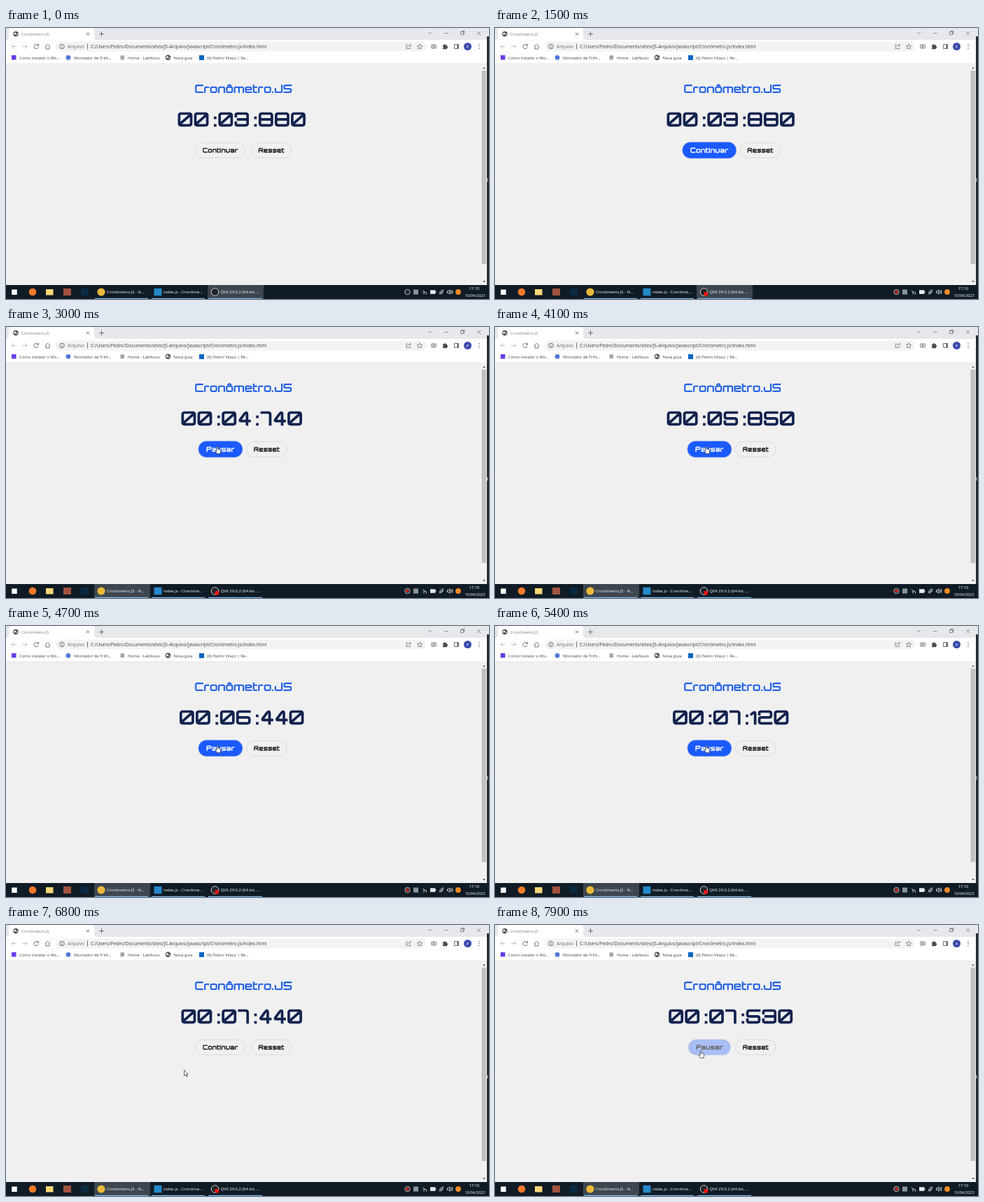
An HTML page that plays this animation: 690 px wide and 388 px high, repeating every 8000 ms.

```html
<!DOCTYPE html>
<html lang="pt-BR">
<head>
<meta charset="utf-8">
<title>Cronômetro.JS</title>
<style>
  html, body { margin: 0; width: 100%; height: 100%; overflow: hidden; background: #f0f0f0; }
  svg { display: block; width: 690px; height: 388px; }
  text { font: 5.85px "Open Sans", "Noto Sans", sans-serif; fill: #3c4043; }
  .url { font-size: 6.7px; }
  .bar text { fill: #fff; }
  .line { fill: none; stroke: #5f6368; stroke-width: .9; }
  .glyphs { fill: none; stroke-linecap: square; }
  .pill { stroke-width: .7; }
</style>
</head>
<body>
<svg viewBox="0 0 690 388">
  <defs>
    <g id="globe">
      <circle r="3.7" fill="#4a4d51"/>
      <path d="M-2.6-1.2Q-1-2.6 .3-1.6T-.4.5-1 2.6Q-2.8 1-2.6-1.2M1 .4 2.6-.6Q2.8 1.4 1.2 2.4Z" fill="#fff"/>
    </g>
  </defs>

  <!-- browser frame -->
  <rect width="690" height="388" fill="#f0f0f0"/>
  <rect width="690" height="17" fill="#e6e8eb"/>
  <path d="M0 17Q4 17 4 13V4Q4 0 8 0H122Q126 0 126 4V13Q126 17 130 17Z" fill="#fff"/>
  <rect y="17" width="688" height="34" fill="#fff"/>
  <path d="M0 51.2H688" stroke="#dcdee1" stroke-width=".6"/>
  <rect x="71" y="19.5" width="529" height="14" rx="7" fill="#f1f3f4"/>
  <use href="#globe" x="14" y="8.5"/>
  <text x="22" y="10.8" style="fill:#777b80">Cronômetro.JS</text>
  <g class="line">
    <path d="M115 6.500l4 4m0-4l-4 4M133 8.500h7m-3.500-3.500v7"/>
    <path d="M603 6l2.500 2.500 2.500-2.500M626.500 7.500h5M649.500 5.500h4v4h-4zM651 5.500v-1.200h3.800v4h-1.300M673 5l5 5m0-5l-5 5" stroke-width=".7"/>
    <path d="M14.500 26.500h-6.500m3-3l-3 3 3 3M23.500 26.500h6.500m-3-3l3 3-3 3" stroke="#b5b8bc"/>
    <path d="M45.800 24.600A3.200 3.200 0 1 0 46.300 27.500M46.500 22.800v2.500h-2.500"/>
    <path d="M56 26.500l3.500-3.500 3.500 3.500M57 26v4h5v-4"/>
    <circle cx="80" cy="26.500" r="3.300"/><path d="M80 26v2.500M80 24.300v.8M116.500 22.500v8"/>
    <path d="M574 24h-2v5.500h5.500v-2M573.800 27.500q.4-3 4.700-3.200m-1.600-1.800l1.700 1.800-1.700 1.800" stroke-width=".7"/>
    <path d="M591 22.800l1.100 2.500 2.700.2-2 1.800.6 2.700-2.400-1.400-2.400 1.400.6-2.700-2-1.800 2.700-.2z" stroke-width=".7"/>
    <rect x="607.800" y="24" width="6.500" height="5" rx=".8"/><circle cx="611" cy="26.500" r="1.200"/>
    <path d="M640.500 23.500h6v6h-6z"/><path d="M645.500 23.500v6" stroke-width="2"/>
  </g>
  <path d="M624 24.500h1.700a1.300 1.300 0 0 1 2.600 0h1.700v1.700a1.300 1.300 0 0 1 0 2.600v1.500h-6v-1.900a1.200 1.200 0 0 0 0-2.200z" fill="#4a4d51"/>
  <circle cx="659.500" cy="26.500" r="5.500" fill="#3949ab"/>
  <text x="659.500" y="28.600" text-anchor="middle" style="fill:#fff">P</text>
  <path d="M676 23.400v.1m0 2.900v.1m0 2.900v.1" stroke="#4a4d51" stroke-width="1.300" stroke-linecap="round"/>
  <text class="url" x="88" y="28.900" style="fill:#6b6f74">Arquivo</text>
  <text class="url" x="121" y="28.900">C:/Users/Pedro/Documents/sites/JS-Arquivo/Javascript/Cronômetro.Js/index.html</text>

  <!-- bookmarks -->
  <rect x="8" y="39" width="6.500" height="6.500" fill="#673de6"/>
  <text x="19" y="44.500">Como instalar o Wo...</text>
  <circle cx="89" cy="42.300" r="3.400" fill="#4f78d8"/>
  <text x="97" y="44.500">Montador de Trilh...</text>
  <rect x="163.500" y="39.300" width="5.500" height="6" fill="#a3a6aa"/>
  <text x="174" y="44.500">Home - LabNuvo</text>
  <use href="#globe" x="231.500" y="42.300"/>
  <text x="239.500" y="44.500">Nova guia</text>
  <rect x="276" y="39" width="7" height="7" fill="#0a66c2"/>
  <text x="287" y="44.500">(6) Pedro Vilaço | Re...</text>

  <!-- scrollbar and screen edge -->
  <rect x="678.500" y="51.500" width="8.500" height="316.500" fill="#f1f1f1"/>
  <rect x="679.500" y="61" width="6.500" height="277" fill="#c1c1c1"/>
  <path d="M681 58.200l2-2.200 2 2.200zM681 362l2 2.200 2-2.200z" fill="#555"/>
  <rect x="687" y="12" width="3" height="356" fill="#25282d"/>
  <rect x="687" y="215" width="1.500" height="5" fill="#9a9da1"/>

  <!-- page -->
  <path id="title" class="glyphs" stroke="#1f5fe6" role="img"/>
  <path id="clock" class="glyphs" stroke="#13234f" role="img"/>
  <g id="main"><rect class="pill"/><path class="glyphs"/></g>
  <g id="reset"><rect class="pill"/><path class="glyphs"/></g>

  <!-- taskbar -->
  <g class="bar">
    <rect y="368" width="690" height="20" fill="#101b25"/>
    <rect id="active" y="368" width="80" height="20" fill="#3d464f"/>
    <g fill="#76b9ed">
      <rect y="386.800" x="127" width="76" height="1.200"/>
      <rect y="386.800" x="208" width="76" height="1.200"/>
      <rect y="386.800" x="289" width="77" height="1.200"/>
    </g>
    <rect x="8.200" y="374.500" width="7.500" height="7.500" fill="#fff"/>
    <circle cx="38" cy="378" r="5.300" fill="#f47a2a"/>
    <rect x="57" y="374" width="10.500" height="8.500" fill="#f8d775"/>
    <rect x="82" y="373" width="11" height="10" fill="#a2533f"/>
    <rect x="107" y="373" width="11" height="10" fill="#0a2a43"/>
    <circle cx="136" cy="378" r="5.600" fill="#e9b93a"/>
    <rect x="211.500" y="372.800" width="11" height="10.500" fill="#2489ca"/>
    <circle cx="298.500" cy="378" r="5.300" fill="#20242a" stroke="#e4e4e4" stroke-width=".9"/>
    <circle class="rec" cx="301.200" cy="380.800" r="3" fill="#f01414"/>
    <text x="144" y="380.200">Cronômetro.JS - N...</text>
    <text x="225" y="380.200">index.js - Cronôme...</text>
    <text x="306.500" y="380.200">QVX 29.0.2 (64-bit, ...</text>

    <circle cx="573.500" cy="378" r="3.700" fill="#20242a" stroke="#e4e4e4" stroke-width=".8"/>
    <circle class="rec" cx="573.500" cy="378" r="2.100" fill="#e02020"/>
    <rect x="582" y="374.500" width="7" height="7" fill="#8d959c"/>
    <g fill="none" stroke="#e8eaec" stroke-width=".9">
      <path d="M595 375.500l2 2v4M597 377.500l3.500 1.500v2.500"/>
      <rect x="606.500" y="375.800" width="6.500" height="4.500" fill="#e8eaec"/><path d="M614 377v2"/>
      <path d="M619 381.500l6-6M621.500 381.500a4 4 0 0 1 3.500-3.500M619.500 380a6 6 0 0 1 5.500-5"/>
      <path d="M630.500 376.800h1.500l2-2v6.500l-2-2h-1.500zM635.500 376.300q1.300 1.700 0 3.400M637 375q2.300 3 0 6"/>
    </g>
    <circle cx="646" cy="378" r="3.900" fill="#f08a24"/>
    <text x="669" y="375.300" text-anchor="middle">17:10</text>
    <text x="670" y="384.700" text-anchor="middle" style="font-size:5.500px">10/04/2023</text>
  </g>

  <g fill="#fff" stroke="#26282c" stroke-width=".7" stroke-linejoin="round">
    <path id="arrow" d="M0 0V8.200L1.900 6.500 3.100 9.300 4.400 8.800 3.200 6H5.700Z"/>
    <path id="hand" d="M-.9.9Q-.9 0 0 0T.9.9V3.700L4 4.400Q4.900 4.700 4.800 5.600L4 10.500H-.3L-2.900 6.800Q-3 5.500-1.900 5.700L-.9 6.700Z"/>
  </g>
</svg>
<script>
const $ = id => document.getElementById(id);
const LOOP = 8000, STEP = 100, FADE = 300;
const CAP = .74, XH = .58, SIDE = .04;

// Corners follow the keyboard: qwe on top, asd in the middle, zxc at the base.
const NODES = {
  q: [0, 0], w: [.5, 0], e: [1, 0], a: [0, .5], s: [.5, .5], d: [1, .5],
  z: [0, 1], x: [.5, 1], c: [1, 1],
  j: [0, .72], k: [1, .72], p: [.6, 0], v: [.76, 0], b: [.76, 1],
  g: [0, .22], n: [0, .78], m: [.2, .5],
  '<': [.14, .83], '>': [.86, .17], ':': [0, .36],
  T: [0, -.36], l: [.26, -.28], h: [.5, -.5], r: [.74, -.28]
};

// Advance in em, then the strokes.
const GLYPHS = {
  0: [.83, 'qeczq <>'], 1: [.4, 'gec'], 2: [.82, 'gqedazc'], 3: [.82, 'gqeczn md'],
  4: [.74, 'kjpvb'], 5: [.82, 'eqadczn'], 6: [.825, 'eqzcda'], 7: [.645, 'qec'],
  8: [.83, 'qeczq ad'], 9: [.83, 'daqecz'], ':': [.23, 'z :'], ' ': [.19, ''],
  C: [.8, 'eqzc'], J: [.78, 'ecza'], P: [.8, 'zqeda'], R: [.81, 'zqeda sc'], S: [.81, 'eqadcz'],
  a: [.7, 'qeczad'], e: [.7, 'adeqzc'], i: [.24, 'qz T'], m: [.98, 'zqec wx'], n: [.7, 'zqec'],
  o: [.7, 'qeczq'], 'ô': [.7, 'qeczq lhr'], r: [.53, 'zqe'], s: [.7, 'eqadcz'],
  t: [.46, 'Tzc qe'], u: [.7, 'qzce'], '.': [.24, 'z']
};

const mix = (a, b, k) => a + (b - a) * k;
const clamp = k => Math.max(0, Math.min(1, k));

function toward(a, b, dist) {
  const len = Math.hypot(b[0] - a[0], b[1] - a[1]) || 1;
  const k = Math.min(dist / len, .5);
  return [mix(a[0], b[0], k), mix(a[1], b[1], k)];
}

function trace(pts, radius) {
  if (pts.length === 1) return `M${pts[0]}h.01`;
  if (String(pts[0]) === String(pts.at(-1))) {
    const mid = toward(pts[0], pts[1], Infinity);
    pts = [mid, ...pts.slice(1), mid];
  }
  let d = `M${pts[0]}`;
  for (let i = 1; i < pts.length - 1; i++) {
    d += `L${toward(pts[i], pts[i - 1], radius)}Q${pts[i]} ${toward(pts[i], pts[i + 1], radius)}`;
  }
  return d + `L${pts.at(-1)}`;
}

function outline(text, em, pen) {
  let x = 0, d = '';
  for (const ch of text) {
    const [adv, strokes] = GLYPHS[ch];
    const high = (/[a-zô]/.test(ch) ? XH : CAP) * em - pen;
    const wide = Math.max(0, (adv - 2 * SIDE) * em - pen);
    const left = x + SIDE * em + pen / 2;
    const place = c => [left + NODES[c][0] * wide, -pen / 2 - (1 - NODES[c][1]) * high];
    for (const s of strokes.split(' ').filter(Boolean)) d += trace([...s].map(place), em * .1);
    x += adv * em;
  }
  return { d, width: x };
}

function write(el, text, em, pen, cx, base) {
  const { d, width } = outline(text, em, pen);
  el.setAttribute('d', d);
  el.setAttribute('transform', `translate(${cx - width / 2} ${base})`);
  el.setAttribute('stroke-width', pen);
  el.setAttribute('aria-label', text);
}

const blend = (a, b, k) => `rgb(${a.map((v, i) => Math.round(mix(v, b[i], k)))})`;

function button(id, label, cx, width, hover) {
  const g = $(id), [rect, path] = g.children;
  g.setAttribute('transform', `translate(${cx} 175) scale(${1 + .08 * hover})`);
  const box = { x: -width / 2, y: -10.8, width, height: 21.6, rx: 10.8 };
  for (const key in box) rect.setAttribute(key, box[key]);
  rect.style.fill = blend([240, 240, 240], [26, 90, 255], hover);
  rect.style.stroke = blend([208, 209, 212], [150, 172, 228], hover);
  path.style.stroke = blend([28, 28, 30], [255, 255, 255], hover);
  write(path, label, 9.15, 1.3, 0, 3.4);
}

// Linear track through [time, ...values] points.
function track(points, t) {
  const i = points.findIndex(p => p[0] > t);
  if (i === 0) return points[0].slice(1);
  if (i < 0) return points.at(-1).slice(1);
  const a = points[i - 1], b = points[i], k = (t - a[0]) / (b[0] - a[0]);
  return a.slice(1).map((v, n) => mix(v, b[n + 1], k));
}

const COUNT = [[2140, 3880], [3000, 4740], [4100, 5850], [5400, 7120], [5730, 7440], [7810, 7440], [7900, 7530]];
const POINTER = [[5950, 302, 171], [6300, 256, 206.5], [6750, 256, 206.5], [7000, 249, 213], [7400, 294, 180]];

function hoverAt(t) {
  const rise = start => clamp((t - start) / FADE);
  if (t < 2100) return rise(1200);
  if (t < 5750) return rise(2100);
  if (t < 7150) return rise(5750) * (1 - rise(6050));
  return t < 7800 ? rise(7150) : rise(7800);
}

function clockText(ms) {
  const pad = (n, len) => String(n).padStart(len, '0');
  return `00 :${pad(Math.floor(ms / 1000), 2)} :${pad(ms % 1000, 3)}`;
}

function draw(t) {
  const ms = Math.round(track(COUNT, t)[0] / 10) * 10;
  write($('clock'), clockText(ms), 27.8, 3.7, 336.7, 141.2);

  const running = t >= 2100 && t < 5750 || t >= 7800;
  if (running) button('main', 'Pausar', 306.4, 58.5, hoverAt(t));
  else button('main', 'Continuar', 306.2, 71.5, hoverAt(t));
  button('reset', 'Resset', running ? 372.4 : 379, 57.5, 0);

  $('active').setAttribute('x', t < 2100 ? 288 : 126);
  for (const dot of document.querySelectorAll('.rec')) dot.style.display = t < 100 ? 'none' : '';

  const [x, y] = track(POINTER, t);
  const over = x > 270 && y < 187;
  for (const id of ['hand', 'arrow']) {
    $(id).setAttribute('transform', `translate(${x} ${y})`);
    $(id).style.display = t >= 1900 && over === (id === 'hand') ? '' : 'none';
  }
}

write($('title'), 'Cronômetro.JS', 16.15, 2.1, 339.2, 93);

let last = -1;
function tick() {
  const t = Math.floor(performance.now() % LOOP / STEP) * STEP;
  if (t !== last) draw(last = t);
  requestAnimationFrame(tick);
}
tick();
</script>
</body>
</html>
```
